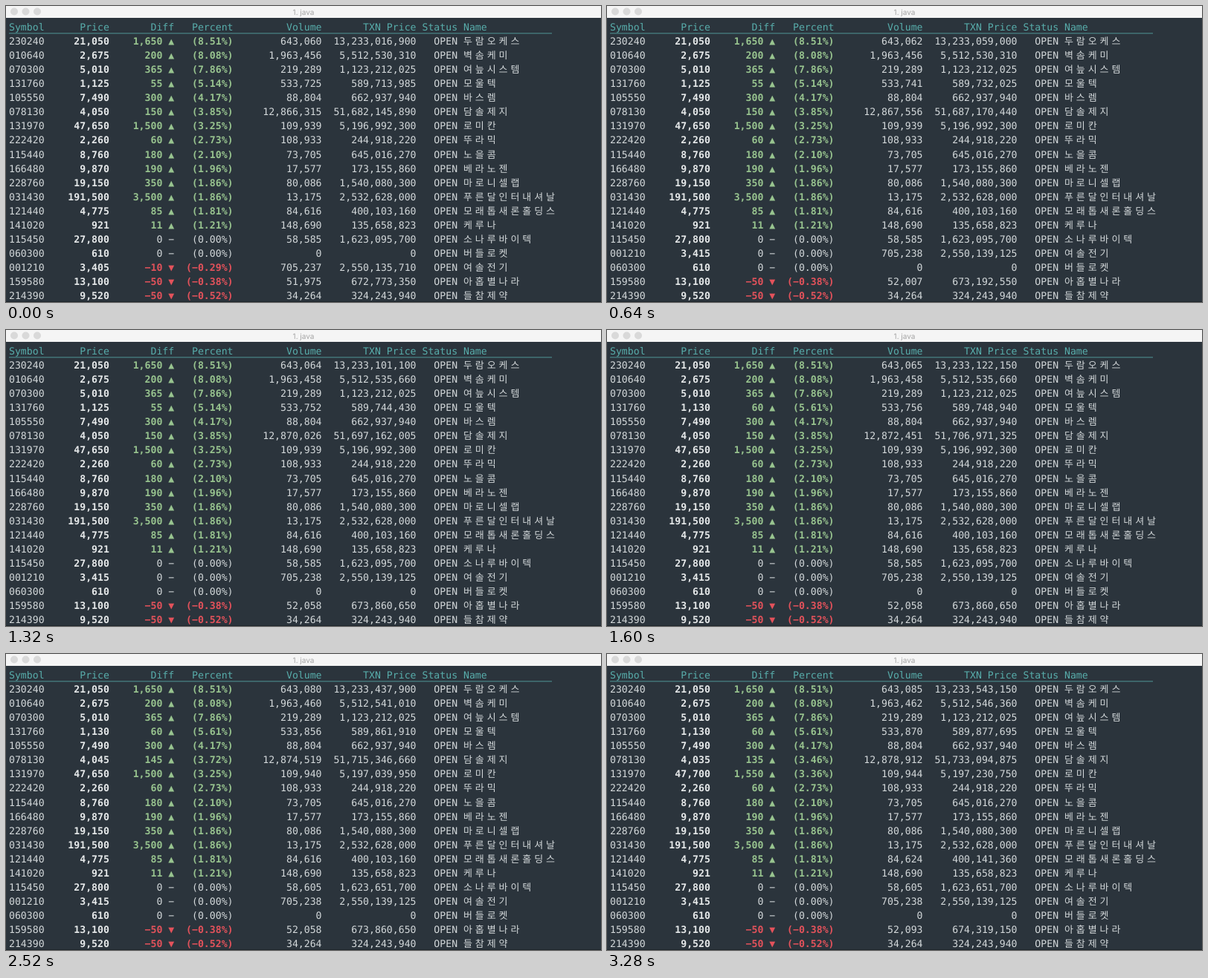
An HTML page with a canvas for the animation above (3.32 s loop, 800 by 399 pixels).

```html
<!DOCTYPE html>
<html lang="ko">
<head>
<meta charset="utf-8">
<style>
html, body { margin: 0; width: 100%; height: 100%; overflow: hidden; background: #2b343c; }
canvas { display: block; }
</style>
</head>
<body>
<canvas width="800" height="399"></canvas>
<script>
const ctx = document.querySelector('canvas').getContext('2d');
const LOOP = 3320, FRAME = 40;
const CELL = 7.935, LEFT = 4, LINE = 19.06, BASE = 33;
const TEXT = '#d3d8da', PRICE = '#e6e9ea', TEAL = '#58adab', UP = '#98c48f', DOWN = '#e3525b';
const MONO = '13.18px "DejaVu Sans Mono", monospace';
const HANGUL = '300 13px "Noto Sans CJK KR", "Noto Sans CJK", sans-serif';

// symbol, name, price, previous close, volume, traded value
const stocks = `
230240 두람오케스 21050 19400 643060 13233016900
010640 벽솜케미 2675 2475 1963456 5512530310
070300 여늪시스템 5010 4645 219289 1123212025
131760 모울텍 1125 1070 533725 589713985
105550 바스렘 7490 7190 88804 662937940
078130 담솔제지 4050 3900 12866315 51682145890
131970 로미칸 47650 46150 109939 5196992300
222420 뚜라믹 2260 2200 108933 244918220
115440 노을콤 8760 8580 73705 645016270
166480 베라노젠 9870 9680 17577 173155860
228760 마로니셀랩 19150 18800 80086 1540080300
031430 푸른달인터내셔날 191500 188000 13175 2532628000
121440 모래톱새론홀딩스 4775 4690 84616 400103160
141020 케루나 921 910 148690 135658823
115450 소나루바이텍 27800 27800 58585 1623095700
001210 여솔전기 3405 3415 705237 2550135710
060300 버들로켓 610 610 0 0
159580 아홉별나라 13100 13150 51975 672773350
214390 들참제약 9520 9570 34264 324243940`.trim().split('\n').map(row => {
  const [symbol, name, ...numbers] = row.split(' ');
  return [symbol, name, ...numbers.map(Number)];
});

// Trades per period: shares, or [shares, new price, value]
const periods = [0, 320, 1000, 1600, 1920, 2520, 3280];
const trades = {
  230240: [1, 2, 2, 14, 1, 5],
  '010640': [0, 1, 1, 1, 1, 2],
  131760: [[8, 1125, 9020], [8, 1125, 9020], [15, 1130, 16915],
           [93, 1125, 105075], [7, 1130, 7895], [14, 1130, 15785]],
  '078130': [[1108, 4050, 4485900], 177, [4851, 4050, 19622685],
             873, [1195, 4045, 4839685], [4393, 4035, 17748215]],
  131970: [0, 0, 0, 0, 1, [4, 47700]],
  121440: [0, 0, 0, 0, 0, 8],
  115450: [0, 0, 0, 20],
  '001210': [[1, 3415]],
  159580: [0, 63, 20, 0, 0, 35]
};

function quote([symbol, name, price, close, volume, value], index, time) {
  (trades[symbol] || []).forEach((trade, i) => {
    const [shares, newPrice = price, sum = shares * newPrice] = [trade].flat();
    if (!shares || time < periods[i]) return;
    const u = (time - periods[i]) / (periods[i + 1] - periods[i]);
    const end = 0.3 + 0.6 * ((index * 0.618 + i * 0.37) % 1);
    const steps = Math.min(shares, 4);
    const part = Math.min(1, Math.floor(u / end * steps) / steps);
    const done = Math.round(shares * part);
    volume += done;
    value += Math.round(sum * done / shares / 5) * 5;
    if (part === 1) price = newPrice;
  });
  const diff = price - close;
  return { symbol, name, price, diff, volume, value, percent: diff / close * 100 };
}

const number = n => n.toLocaleString('en-US').replace('-', '−');

// Places each character in its own terminal cell
function put(text, col, row, color, bold = false) {
  ctx.fillStyle = color;
  for (const ch of text) {
    const wide = ch >= '가' && ch <= '힣';
    ctx.font = wide ? HANGUL : (bold ? 'bold ' : '') + MONO;
    ctx.fillText(ch, LEFT + col * CELL, BASE + row * LINE);
    col += wide ? 2 : 1;
  }
}

const putRight = (text, end, ...rest) => put(text, end - text.length, ...rest);

function drawWindow() {
  ctx.fillStyle = '#2b343c';
  ctx.fillRect(0, 0, 800, 399);
  ctx.fillStyle = '#f5f5f5';
  ctx.fillRect(0, 0, 800, 16);
  ctx.fillStyle = '#d9d9d9';
  for (const x of [11, 26.5, 42]) {
    ctx.beginPath();
    ctx.arc(x, 7.5, 5, 0, 7);
    ctx.fill();
  }
  ctx.fillStyle = '#a5a5a5';
  ctx.font = '10px Inter, sans-serif';
  ctx.textAlign = 'center';
  ctx.fillText('1. java', 400, 11.5);
  ctx.textAlign = 'left';
  ctx.fillStyle = '#1d252b';
  ctx.fillRect(0, 398, 800, 1);
}

function drawHeader() {
  put('Symbol', 0, 0, TEAL);
  putRight('Price', 17, 0, TEAL);
  putRight('Diff', 28, 0, TEAL);
  putRight('Percent', 38, 0, TEAL);
  putRight('Volume', 53, 0, TEAL);
  putRight('TXN Price', 69, 0, TEAL);
  put('Status', 70, 0, TEAL);
  put('Name', 77, 0, TEAL);
  ctx.fillRect(LEFT, 36.5, 92 * CELL, 0.8);
}

function drawRow(q, row) {
  const sign = Math.sign(q.diff);
  const color = [DOWN, TEXT, UP][sign + 1];
  const percent = `(${q.percent.toFixed(2)}%)`.replace('-', '−');
  put(q.symbol, 0, row, TEXT);
  putRight(number(q.price), 17, row, PRICE, true);
  putRight(number(q.diff) + ' ' + '▼−▲'[sign + 1], 28, row, color, sign !== 0);
  putRight(percent, 38, row, color, sign !== 0);
  putRight(number(q.volume), 53, row, TEXT);
  putRight(number(q.value), 69, row, TEXT);
  put('OPEN', 72, row, TEXT);
  put(q.name, 77, row, TEXT);
}

function draw() {
  const time = Math.floor(performance.now() % LOOP / FRAME) * FRAME;
  ctx.textRendering = 'geometricPrecision';
  drawWindow();
  drawHeader();
  stocks.map((stock, i) => quote(stock, i, time))
    .sort((a, b) => b.percent - a.percent)
    .forEach((q, i) => drawRow(q, i + 1));
  requestAnimationFrame(draw);
}
draw();
</script>
</body>
</html>
```
